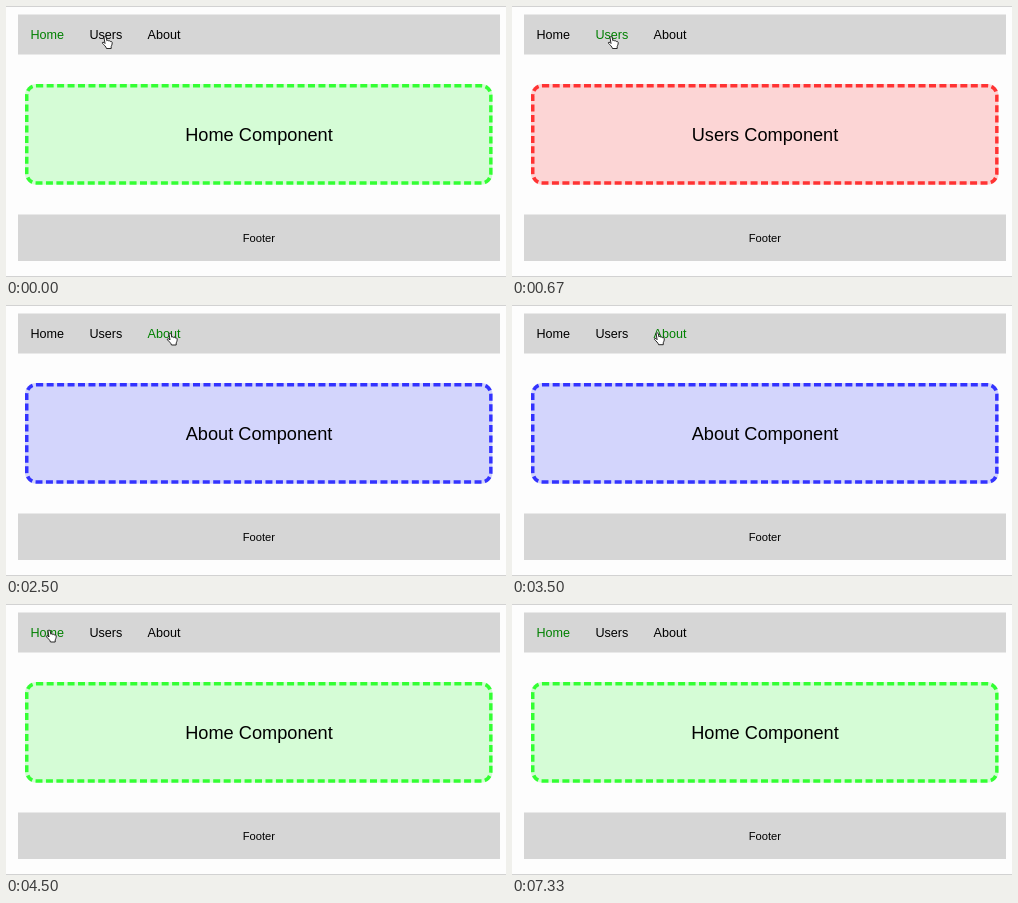
Write an HTML page that moves like this. It is 500 px wide and 271 px high and loops after 7.99 s.

```html
<!DOCTYPE html>
<html lang="en">
<head>
<meta charset="utf-8">
<title>Page navigation</title>
<style>
html, body { margin: 0; width: 100%; height: 100%; overflow: hidden; background: #fdfdfd; }
svg { position: absolute; left: 0; top: 0; font-family: "Liberation Sans", Arial, sans-serif; }
/* Drawn larger and scaled down so the dashed border keeps a fractional width */
#panel {
  position: absolute; left: 19px; top: 78px; width: 668px; height: 144px;
  box-sizing: border-box; border: 5px dashed; border-radius: 16px;
  transform: scale(.7); transform-origin: 0 0;
}
</style>
</head>
<body>
<div id="panel"></div>
<svg width="500" height="271" viewBox="0 0 500 271">
  <path d="M0 .5H500M0 270.5H500" stroke="#d2d2d2"/>
  <path d="M12 8.5H494V48.5H12ZM12 208.5H494V255H12Z" fill="#d6d6d6"/>
  <g id="nav" font-size="12.6">
    <text x="24.4" y="33">Home</text>
    <text x="83.4" y="33">Users</text>
    <text x="141.6" y="33">About</text>
  </g>
  <text id="title" x="253" y="135" font-size="18.2" text-anchor="middle"></text>
  <text x="252.8" y="235.5" font-size="11.2" text-anchor="middle">Footer</text>
  <path id="hand" fill="#fff" stroke="#111" stroke-width=".9" stroke-linejoin="round"
    d="M2 1C2-.2 4-.2 4.2 1L4.8 4.2C5.4 3.5 6.5 3.8 6.8 4.6C7.4 4 8.4 4.3 8.6 5.1C9.4 4.7 10.2 5.2 10.2 6.2C10.2 8 9.6 9 9.2 10V12H4.5C4 10 2 8.5 .6 7C-.2 6 .9 5.2 2 6L3 7Z"/>
</svg>
<script>
const LOOP = 7990, STEP = 1000 / 6;
const pages = [
  { name: "Home", line: "#33ff33", fill: "#d5fcd6" },
  { name: "Users", line: "#ff3333", fill: "#fcd5d5" },
  { name: "About", line: "#3333ff", fill: "#d3d5fc" }
];
const onUsers = [96, 30.5], onAbout = [161, 28], onHome = [40, 26];
const HIDE = 31;
const [panel, nav, title, hand] =
  ["panel", "nav", "title", "hand"].map(id => document.getElementById(id));

const pageAt = n => n < 1 ? 0 : n < 15 ? 1 : n < 27 ? 2 : 0;

// Eased progress between two steps
function ease(n, from, to) {
  const p = Math.min(1, Math.max(0, (n - from) / (to - from)));
  return p * p * (3 - 2 * p);
}

function handAt(n) {
  const [a, b, p] = n < 15
    ? [onUsers, onAbout, ease(n, 7, 12)]
    : [onAbout, onHome, ease(n, 20, 24)];
  return a.map((v, i) => v + (b[i] - v) * p);
}

function draw(now) {
  const n = Math.floor((now % LOOP + 4) / STEP);
  const current = pageAt(n), page = pages[current];
  panel.style.borderColor = page.line;
  panel.style.backgroundColor = page.fill;
  title.textContent = page.name + " Component";
  [...nav.children].forEach((link, i) =>
    link.setAttribute("fill", i === current ? "#008000" : "#000"));
  hand.setAttribute("visibility", n < HIDE ? "visible" : "hidden");
  hand.setAttribute("transform", `translate(${handAt(n)})`);
}

const start = performance.now();
function tick() {
  draw(performance.now() - start);
  requestAnimationFrame(tick);
}
tick();
</script>
</body>
</html>
```
